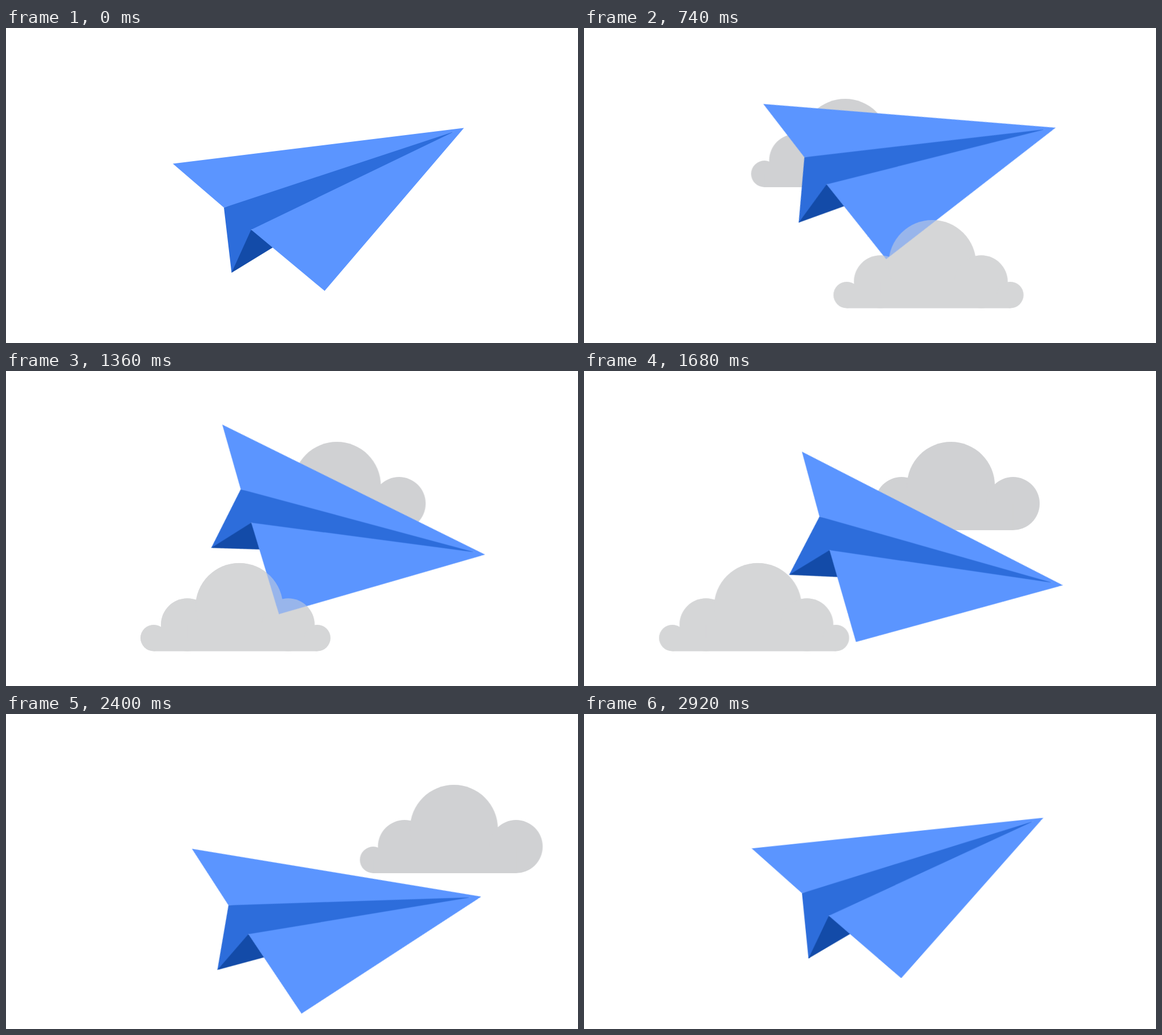
An HTML page for the animation above (2940 ms loop, 1008 by 556 pixels).

```html
<!DOCTYPE html>
<html lang="en">
<head>
<meta charset="utf-8">
<title>Paper plane</title>
<style>
  html, body { margin: 0; width: 100%; height: 100%; overflow: hidden; background: #fff; }
  svg { display: block; width: 100vw; height: 100vh; }

  /* Script scrubs these paused animations, cutting the 3 s cycle at 2.94 s. */
  .far, .near, .lift, .tilt { animation: 3000ms linear infinite paused; }
  .far { animation-name: far-move, far-fade; fill: #d0d1d3; }
  .near { animation-name: near-move, near-fade; fill: #d5d6d7; }
  .lift { animation-name: lift; animation-timing-function: cubic-bezier(.3333, 0, .6667, 1); }
  .tilt { animation-name: tilt; }

  @keyframes far-move {
    from { transform: translate(147.5px, 125px); }
    to { transform: translate(742.4px, 125px); }
  }
  @keyframes far-fade {
    0%, 97.33%, 100% { opacity: 0; }
    16%, 81.33% { opacity: 1; }
  }
  @keyframes near-move {
    0% { transform: translate(682px, 339px); }
    68%, 100% { transform: translate(15px, 339px); }
  }
  @keyframes near-fade {
    0%, 76%, 100% { opacity: 0; }
    16%, 60% { opacity: 1; }
  }
  @keyframes lift {
    0%, 100% { transform: translate(547px, 322px); }
    29.67% { transform: translate(547px, 261.5px); }
    73.33% { transform: translate(547px, 401px); }
  }
  @keyframes tilt {
    0% { transform: rotate(0deg); animation-timing-function: cubic-bezier(.557, 0, .63, 1); }
    52% { transform: rotate(34.9deg); animation-timing-function: cubic-bezier(.303, 0, .86, 1); }
    100% { transform: rotate(0deg); }
  }
</style>
</head>
<body>
<svg viewBox="0 0 1008 556" preserveAspectRatio="none">
  <defs>
    <g id="near-cloud">
      <circle cx="23.3" cy="132.2" r="23.3"/>
      <circle cx="82.6" cy="108.9" r="46.6"/>
      <circle cx="174" cy="77" r="77"/>
      <circle cx="260.2" cy="108.9" r="46.6"/>
      <circle cx="311.4" cy="132.2" r="23.3"/>
      <path d="M23.3 155.5V132.2H82.6V108.9H260.2V132.2H311.4V155.5Z"/>
    </g>
  </defs>

  <g class="far">
    <circle cx="23.4" cy="132.5" r="23.4"/>
    <circle cx="78.7" cy="109" r="46.9"/>
    <circle cx="165.7" cy="77.4" r="77.4"/>
    <circle cx="275.2" cy="109" r="46.9"/>
    <path d="M23.4 155.9V132.5H78.7V109H275.2V155.9Z"/>
  </g>

  <!-- The near cloud lies both under and, half clear, over the plane. -->
  <g class="near"><use href="#near-cloud"/></g>

  <g class="lift">
    <g class="tilt">
      <path fill="#134ba8" d="M-149.5 110L-140 50L-115 34L-60 60L-77 65.5Z"/>
      <path fill="#2d6ddb" d="M-163 -5L100 -110L243 -139.3L0 0L-115 34L-149.5 110Z"/>
      <path fill="#5b95ff" d="M-253 -82.5L260 -145.5L14.5 142L-115 34L243 -139.3L-163 -5Z"/>
    </g>
  </g>

  <g class="near"><g opacity=".5"><use href="#near-cloud"/></g></g>
</svg>
<script>
  const LOOP = 2940;
  const anims = document.getAnimations();
  const start = performance.now();

  function draw() {
    const t = (performance.now() - start) % LOOP;
    for (const a of anims) a.currentTime = t;
    requestAnimationFrame(draw);
  }
  draw();
</script>
</body>
</html>
```
